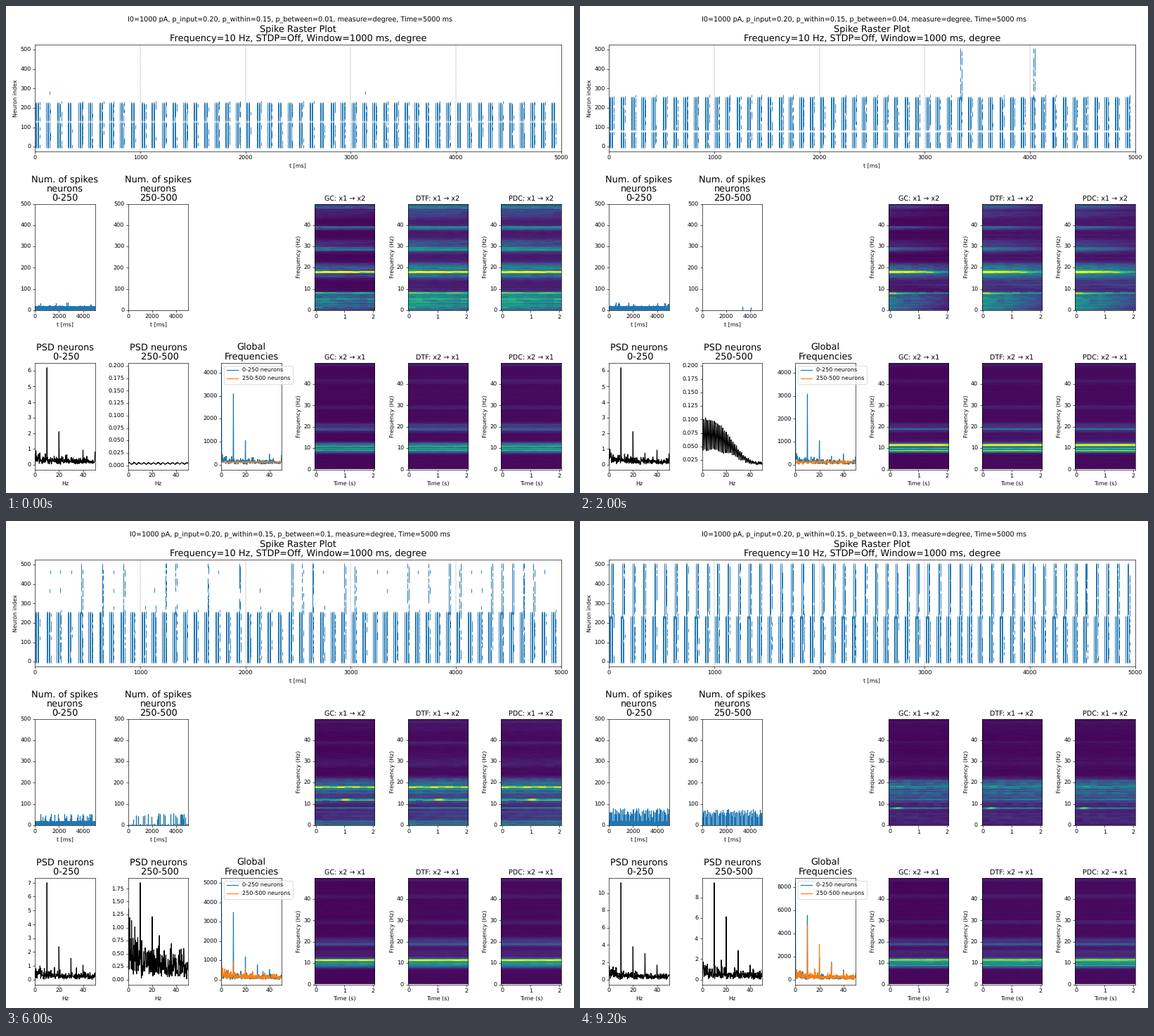
These frames come from a looping animation (808 by 693 pixels, 10000 ms). A matplotlib script:

```python
import numpy as np
import matplotlib.pyplot as plt
from matplotlib.animation import FuncAnimation

plt.rcParams["text.hinting"] = "none"

W, H, DPI = 808, 693, 57.75
LEFT, PITCH, BOX_W, BOX_H = 41.2, 132.6, 85.4, 151.6
ROWS = (55.4, 281.5, 507.9)
FREQ = np.arange(251) * 0.2
BLUE, ORANGE = "tab:blue", "tab:orange"

# loud/share: cycles in which the second group may fire, and how often it does.
# hot: (Hz, relative time) of a brief maximum in the upper heat maps.
SCENES = [
    dict(top=222, hole=130, loud=range(0), share=0, echo=0.05,
         peak=6.2, peak2=0, dc=4220, tilt=-0.3, hot=None),
    dict(top=251, hole=80, loud=range(33, 41, 7), share=1, echo=0,
         peak=6.2, peak2=0, dc=4230, tilt=-1.2, hot=None),
    dict(top=251, hole=None, loud=range(12, 32), share=0.55, echo=0.75,
         peak=7.4, peak2=1.68, dc=4770, tilt=0.5, hot=None),
    dict(top=251, hole=None, loud=range(1, 50), share=0.5, echo=0.6,
         peak=7.0, peak2=1.86, dc=5010, tilt=0, hot=(12, 0.52)),
    dict(top=235, hole=None, loud=range(50), share=1, echo=0,
         peak=11.2, peak2=9.45, dc=8370, tilt=-0.1, hot=(8, 0.13)),
]

fig = plt.figure(figsize=(13.99135, 12), dpi=DPI)


def pulse(x, centre, width, power=2):
    return np.exp(-np.abs((x - centre) / width) ** power)


def panel(col, row, title, xlabel="", ylabel="", size=16, cols=1):
    w = BOX_W + (cols - 1) * PITCH
    x, y = LEFT + col * PITCH, ROWS[row]
    ax = fig.add_axes([x / W, 1 - (y + BOX_H) / H, w / W, BOX_H / H])
    ax.set_title(title, fontsize=size, linespacing=1.03)
    ax.set_xlabel(xlabel)
    ax.set_ylabel(ylabel)
    return ax


def draw_raster(ax, k, bursts, rng):
    s = SCENES[k]
    times, cells = [], []

    def column(t, lo, hi, keep=1, chunk=3):
        n = np.arange(lo, hi, 5)
        n = n[np.repeat(rng.random(len(n) // chunk + 1) < keep, chunk)[:len(n)]]
        if s["hole"]:
            n = n[abs(n - s["hole"]) > 7]
        times.extend([t] * len(n))
        cells.extend(n)

    for i in range(50):
        t = 100 * i + (4 if i == 0 else 10 + rng.integers(-3, 4))
        for off in (0, 10, 20):
            column(t + off, 0, s["top"])
        column(t + 30, 0, s["top"], 0.92, 4)
        column(t + 40, 0, s["top"] + 12, rng.uniform(0.15, 0.5), 2)
        if i in bursts:
            full = rng.uniform(0.5, 1) if k < 4 else 0.97
            column(t + 28, 250, 505, full)
            column(t + 38, 250, 505, full * 0.7)
            if k == 4:
                column(t + 18, 230, 505)
        for j, n in enumerate((465, 370, 280)):
            if rng.random() < s["echo"] * 0.75 ** j:
                column(t + 28 + 10 * rng.integers(0, 2), n - 5, n + rng.integers(1, 9))

    for x in range(1000, 5000, 1000):
        ax.axvline(x, color="gray", ls="--", lw=0.6)
    ax.plot(times, cells, "|", color=BLUE)
    ax.set(xlim=(0, 5000), ylim=(-25, 525))


def counts(k, bursts, rng):
    first, second = 21 * rng.uniform(0.8, 1.05, 250), np.zeros(250)
    for i in range(50):
        if i in bursts or rng.random() < 0.15:
            first[5 * i + 1:5 * i + 3] += (16 + 0.7 * k ** 3) * rng.uniform(0.3, 1, 2)
        if i in bursts:
            second[5 * i + 1:5 * i + 3] = 18 * k * rng.uniform(0.5, 1.05, 2)
        elif k > 1:
            second[5 * i + 1] = rng.uniform(1, 8)
    return first, second


def draw_counts(ax, heights):
    x = np.repeat(np.arange(250) * 20 + 10, 3)
    y = np.zeros(len(x))
    y[1::3] = heights
    ax.plot(x, y, color=BLUE)
    ax.set(xlim=(0, 5000), ylim=(0, 500))


def spectrum(level, peak, ratios, rng):
    y = level * rng.rayleigh(0.8, len(FREQ)) * (0.55 + 0.8 * np.exp(-FREQ / 12))
    y[50::50] = peak * np.array([1, *ratios])
    y[0] = 0
    return y


def weak_spectrum(k, rng):
    """Few spikes: a ripple set by the gap between them, and a constant part."""
    if k == 0:
        y = 0.004 + 0.0014 * np.sin(np.pi * FREQ / 2) + rng.normal(0, 4e-4, 251)
    else:
        y = 0.017 + 0.055 * pulse(FREQ, 0, 30, 3) + rng.normal(0, 0.0015, 251)
        y += 0.03 * pulse(FREQ, 0, 27, 2.5) * np.cos(2 * np.pi * 0.7 * FREQ)
        y = np.maximum(y, 0.0124)
    y[0] = 0.196
    return y


def heat(bands, rng, rough):
    """Sum of (Hz, half width, level, tilt) bands broken up by block noise."""
    f = np.arange(0.25, 50, 0.5)[:, None]
    t = np.linspace(0, 1, 24)[None]
    z = np.full((len(f), t.size), 0.02)
    for c, w, level, tilt in bands:
        z += level * (1 + tilt * (t - 0.5)) * pulse(f, c, w, 4)
    z *= rng.uniform(0.75, 1.15, f.shape)
    blocks = np.repeat(rng.normal(0, 0.12, (len(f), 8)), 3, axis=1)
    drift = np.cumsum(rng.normal(0, 0.03, z.shape), axis=1)
    return f, t, z * (1 + rough * (blocks + drift))


def upper_heat(k, rng):
    tilt, hot = SCENES[k]["tilt"], SCENES[k]["hot"]
    mid = pulse(k, 2.4, 0.8)
    bands = [(18, 0.6, 0.7 - 0.11 * k, tilt), (18.6, 3.4, 0.27, tilt / 2),
             (13, 3.5, 0.06 * k, 0), (12, 0.6, 0.8 * mid, -tilt),
             (8, 0.5, 0.42 * (1 - 0.8 * mid), tilt / 2),
             (4, 4, 0.36 * 0.7 ** k, tilt), (0.8, 1.3, 0.4 * mid, 2 * tilt)]
    bands += [(c, 0.9, 0.22 * 0.55 ** k, tilt) for c in (28.6, 38.6, 48.6)]
    bands += [(30, 3, 0.1 * 0.6 ** k, tilt), (46, 3, 0.06 * 0.6 ** k, tilt)]
    f, t, z = heat(bands, rng, 1)
    if hot:
        z += 0.45 * pulse(f, hot[0], 0.5, 4) * pulse(t, hot[1], 0.09)
    return np.clip(z, 0, 1)


def lower_heat(k, rng):
    bands = [(10, 2.2, 0.58, 0), (11.5, 0.5, 0.38 * min(k, 1), 0),
             (8.5, 0.4, 0.36 * pulse(k, 1, 0.5), 0), (18.7, 0.6, 0.15, 0),
             (19.5, 2.2, 0.12, 0), (14.5, 2, 0.02 * k, 0)]
    bands += [(c, 1, 0.04, 0) for c in (29, 41, 49)]
    f, t, z = heat(bands, rng, 0.4)
    dark = (np.arange(len(f)) % 2 == 0)[:, None] & (abs(f - 9.4) < 1.7)
    return np.clip(np.where(dark, 0.7 * z, z), 0, 1)


def draw_heat(col, row, name, z):
    a, b = ("x1", "x2") if row == 1 else ("x2", "x1")
    ax = panel(col, row, f"{name}: {a} → {b}", "Time (s)" if row == 2 else "",
               "Frequency (Hz)", 12)
    ax.imshow(z, origin="lower", aspect="auto", interpolation="nearest",
              extent=(-0.04, 2.06, 0, 49.9), vmin=0, vmax=1, cmap="viridis")


def draw(k):
    s = SCENES[k]
    rng = np.random.default_rng(k + 1)
    bursts = {i for i in s["loud"] if rng.random() < s["share"]}
    between = "0.1" if k == 3 else f"{0.01 + 0.03 * k:.2f}"
    fig.clear()
    fig.suptitle(f"I0=1000 pA, p_input=0.20, p_within=0.15, p_between={between}, "
                 "measure=degree, Time=5000 ms")

    ax = panel(0, 0, "Spike Raster Plot\n"
               "Frequency=10 Hz, STDP=Off, Window=1000 ms, degree",
               "t [ms]", "Neuron index", cols=6)
    draw_raster(ax, k, bursts, rng)

    groups = ("0-250", "250-500")
    for col, heights in enumerate(counts(k, bursts, rng)):
        ax = panel(col, 1, f"Num. of spikes\nneurons\n{groups[col]}", "t [ms]")
        draw_counts(ax, heights)

    first = spectrum(0.05 + 0.05 * s["peak"], s["peak"],
                     (0.34, 0.07 + 0.05 * k, 0.15, 0.13 - 0.02 * k), rng)
    if s["peak2"]:
        second = spectrum(0.36 + 0.04 * s["peak2"], s["peak2"],
                          (0.65, 0.3, 0.15, 0.1), rng)
    else:
        second = weak_spectrum(k, rng)
    for col, y in enumerate((first, second)):
        ax = panel(col, 2, f"PSD neurons\n {groups[col]}", "Hz")
        ax.plot(FREQ, y, color="black")
        ax.set_xlim(0, 50)

    ax = panel(2, 2, "Global\nFrequencies")
    blue, orange = 497 * first, 497 * second
    blue[0] = s["dc"]
    if not s["peak2"]:
        orange = 110 + rng.normal(0, 12 + 23 * k, len(FREQ))
    for group, y, color in zip(groups, (blue, orange), (BLUE, ORANGE)):
        ax.plot(FREQ, y, color=color, label=f"{group} neurons")
    ax.set(xlim=(0, 50), ylim=(-0.05 * s["dc"], 1.05 * s["dc"]))
    ax.legend(loc="upper left")

    up, down = upper_heat(k, rng), lower_heat(k, rng)
    for col, name in enumerate(("GC", "DTF", "PDC"), 3):
        gamma = 1 if name == "GC" else 0.64 + 0.08 * k
        draw_heat(col, 1, name, up ** gamma)
        draw_heat(col, 2, name, down if name == "GC" else down ** 0.9)
    return []


anim = FuncAnimation(fig, draw, frames=len(SCENES), interval=2000,
                     repeat=True, repeat_delay=0)
plt.show()
```
